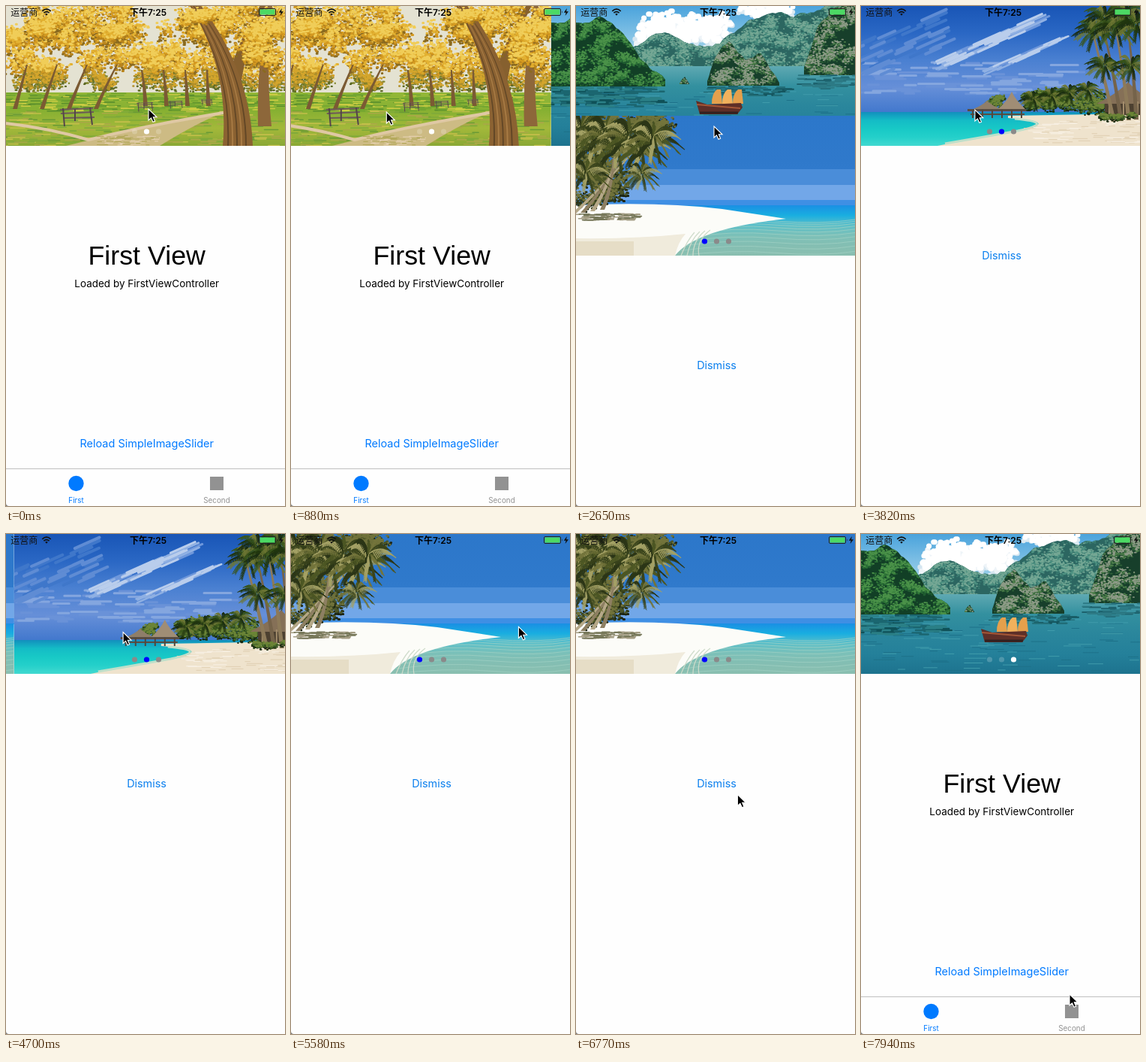
Recreate the animation shown at these times as an HTML page. Size 372 px wide and 665 px high, loop 8 s.

```html
<!DOCTYPE html>
<html lang="en">
<head>
<meta charset="utf-8">
<title>Image slider demo</title>
<style>
html, body { margin: 0; width: 100%; height: 100%; overflow: hidden; background: #fefefe; }
#stage { display: block; width: 372px; height: 665px; }
text { font-family: Inter, Roboto, sans-serif; text-anchor: middle; }
.status text { font-family: Inter, "Noto Sans CJK SC", "Noto Sans CJK", sans-serif; font-size: 12px; }
.title { font-family: "Liberation Sans", sans-serif; }
</style>
</head>
<body>
<svg id="stage" viewBox="0 0 372 665"></svg>
<script>
const W = 372, H = 186, FULL = 665;
const LOOP = 8000, STEP = 147.1;
const fix = n => n.toFixed(1);
const repeat = (n, make) => Array.from({ length: n }, (_, i) => make(i)).join('');

function random(seed) {
  let s = seed * 7919;
  return () => (s = (s * 16807) % 2147483647) / 2147483647;
}

const shape = (d, fill) => `<path d="${d}" fill="${fill}"/>`;
const line = (d, color, width = 1, cap = 'butt') =>
  `<path d="${d}" fill="none" stroke="${color}" stroke-width="${width}" stroke-linecap="${cap}"/>`;
const rect = (x, y, w, h, fill, extra = '') =>
  `<rect x="${x}" y="${y}" width="${w}" height="${h}" fill="${fill}" ${extra}/>`;
const oval = (x, y, rx, ry, fill) =>
  `<ellipse cx="${x}" cy="${y}" rx="${rx}" ry="${ry}" fill="${fill}"/>`;
const label = (x, y, size, fill, str, extra = '') =>
  `<text x="${x}" y="${y}" font-size="${size}" fill="${fill}" ${extra}>${str}</text>`;

// A box filled from top to bottom with evenly spaced colours.
function fade(id, y, h, colors) {
  const stops = colors.map((c, i) =>
    `<stop offset="${i / (colors.length - 1)}" stop-color="${c}"/>`).join('');
  return `<linearGradient id="${id}" x2="0" y2="1">${stops}</linearGradient>` +
    rect(0, y, W, h, `url(#${id})`);
}

// Short round dashes strewn over a box, one path per colour.
function strew(seed, count, [x, y, w, h], size, colors, dash = 1) {
  const rnd = random(seed);
  return colors.map(color => line(
    repeat(count, () => `M${fix(x + rnd() * w)} ${fix(y + rnd() * h)}h${fix(dash * (0.4 + rnd()))}`),
    color, size, 'round')).join('');
}

// Leafy clumps, darkest colour lowest and lightest on top.
function foliage(seed, clumps, [x, y, w, h], spread, size, colors) {
  const rnd = random(seed);
  const centres = Array.from({ length: clumps }, () => [x + rnd() * w, y + rnd() * h]);
  return colors.map((color, k) => line(centres.map(([cx, cy]) => repeat(14, () => {
    const px = cx + (rnd() + rnd() - 1) * spread;
    const py = cy + (rnd() + rnd() - 1) * spread * 0.6 + spread * (0.3 - k * 0.15);
    return `M${fix(px)} ${fix(py)}h${fix(rnd() * 2)}`;
  })).join(''), color, size, 'round')).join('');
}

// A skyline through a few points, roughened by splitting each span.
function hill(seed, points, base, colors) {
  const rnd = random(seed);
  let pts = points;
  for (let round = 0; round < 3; round++) {
    pts = pts.flatMap(([x, y], i) => {
      if (i === pts.length - 1) return [[x, y]];
      const [u, v] = pts[i + 1];
      return [[x, y], [(x + u) / 2, (y + v) / 2 + (rnd() - 0.6) * (u - x) * 0.3]];
    });
  }
  const left = points[0][0], right = points[points.length - 1][0];
  const top = Math.min(...pts.map(p => p[1]));
  const d = `M${left} ${base}L${pts.map(p => p.map(fix).join(' ')).join('L')}L${right} ${base}Z`;
  const box = [left, top, right - left, base - top];
  const clumps = Math.round(box[2] * box[3] / 110);
  return `<clipPath id="hill${seed}"><path d="${d}"/></clipPath>` + shape(d, colors[0]) +
    `<g clip-path="url(#hill${seed})">${foliage(seed, clumps, box, 11, 1.7, colors)}</g>`;
}

// A tapering trunk from its foot to its tip, bent towards a control point.
const trunk = (x, y, cx, cy, tx, ty, w, color) => shape(
  `M${fix(x - w / 2)} ${y}Q${fix(cx - w / 3)} ${cy} ${fix(tx - w / 6)} ${ty}h${fix(w / 3)}` +
  `Q${fix(cx + w / 3)} ${cy} ${fix(x + w / 2)} ${y}Z`, color);

function palm(x, y, r, seed, colors) {
  const rnd = random(seed);
  const fronds = 15;
  return repeat(fronds, i => {
    const a = (i + rnd() * 0.6) / fronds * Math.PI * 2;
    const len = r * (0.75 + rnd() * 0.3);
    const cx = x + Math.cos(a) * len * 0.55, cy = y + Math.sin(a) * len * 0.55 - r * 0.22;
    const ex = x + Math.cos(a) * len, ey = y + Math.sin(a) * len * 0.75 + r * 0.22;
    let d = `M${fix(x)} ${fix(y)}Q${fix(cx)} ${fix(cy)} ${fix(ex)} ${fix(ey)}`;
    for (let t = 0.15; t < 1; t += 0.06) {
      const u = 1 - t;
      const px = u * u * x + 2 * u * t * cx + t * t * ex;
      const py = u * u * y + 2 * u * t * cy + t * t * ey;
      const drop = r * 0.28 * (1.1 - t * 0.7);
      d += `M${fix(px + Math.cos(a) * r * 0.1 + 2)} ${fix(py + drop)}L${fix(px)} ${fix(py)}` +
           `l${fix(Math.cos(a) * r * 0.14 - 2)} ${fix(drop * 0.6)}`;
    }
    return line(d, colors[i % colors.length], fix(Math.max(0.7, r / 32)));
  });
}

function bench(x, y, s) {
  return `<g transform="translate(${x} ${y}) scale(${s})">` +
    line('M0 3L44 1M1 8L45 6M4 14L46 13', '#6d5a57', 2.2) +
    line('M4 1L6 25M20 2V18M40 0L43 23', '#54454a', 2) + '</g>';
}

function park() {
  const gold = ['#8a6a1f', '#b9841c', '#d59a20', '#e3b232', '#f0cd58'];
  const olive = ['#5d6a24', '#80842a', '#b08f2a', '#d3a52c'];
  const bark = '#7b5a33';
  return rect(0, 0, W, H, '#e4e2d2') +
    foliage(2, 75, [0, 30, W, 62], 20, 3, gold) +
    foliage(3, 32, [30, 0, 140, 40], 18, 2.6, gold) +
    foliage(4, 26, [232, 0, 140, 40], 18, 2.6, gold) +
    foliage(5, 38, [0, 90, W, 16], 16, 2.4, olive) +
    fade('grass', 115, 71, ['#94b838', '#86b032', '#a3b83a', '#8aa835']) +
    strew(6, 90, [-10, 116, W, 24], 1.6, ['#5b8f2c', '#c9cb42', '#72a530'], 16) +
    strew(7, 60, [-10, 140, W, 46], 1.6, ['#6a9a35', '#c3bf4a', '#7fa93a', '#a9a847'], 18) +
    shape('M80 186Q150 168 290 141Q250 158 205 186Z', '#cdbb84') +
    line('M0 156Q60 163 110 178Q190 158 290 142', '#dfc8a4', 4) +
    strew(8, 30, [120, 172, 80, 13], 1.2, ['#e4cfae', '#b4a95c'], 10) +
    repeat(4, i => trunk(12 + i * 36, 137, 18 + i * 37, 115, 28 + i * 40, 78, 6, bark)) +
    repeat(5, i => trunk(186 + i * 28, 133, 185 + i * 28, 110, 181 + i * 29, 85, 6, bark)) +
    trunk(345, 160, 340, 80, 352, 0, 18, '#8d673a') +
    trunk(302, 110, 315, 45, 345, -5, 20, '#86602f') +
    trunk(309, 186, 312, 80, 246, -10, 40, '#8b6232') +
    repeat(5, i => trunk(296 + i * 6, 186, 300 + i * 5, 85, 246 + i * 2, 0, 2, i % 2 ? '#a97c45' : '#614626')) +
    foliage(9, 26, [310, 0, 62, 75], 16, 2.6, gold) +
    foliage(10, 7, [235, 5, 45, 20], 12, 2.4, gold) +
    bench(72, 135, 1) + repeat(3, i => bench(174 + i * 43, 128 - i * 2, 0.5 - i * 0.08));
}

function bay() {
  const green = ['#123f26', '#1f5c30', '#2f7738', '#4a9148'];
  const grey = ['#173f2b', '#2f6238', '#4f7f4c', '#8c9a86'];
  const haze = ['#2c6661', '#3a7d72', '#4f9282', '#74a794'];
  const sail = i => shape(`M${181 + i * 14} 130q0 -14 7 -19h5l2 19Z`, i % 2 ? '#f1b15c' : '#e5a04c');
  return fade('baySky', 0, 82, ['#4aa3dc', '#bfe3ef']) +
    foliage(12, 22, [70, 16, 120, 26], 22, 7, ['#d5e6f0', '#eef4f8', '#ffffff']) +
    foliage(13, 8, [225, 0, 60, 8], 18, 6, ['#dceaf2', '#ffffff']) +
    hill(14, [[76, 55], [100, 40], [150, 50], [192, 50], [230, 19], [258, 10], [290, 15], [326, 5], [W, 0]], 88, haze) +
    fade('baySea', 80, 106, ['#5fa9b2', '#33909f', '#2a869c', '#24809a', '#1d738e']) +
    hill(15, [[304, 82], [322, 28], [346, 2], [W, -4]], 92, grey) +
    hill(16, [[0, 22], [35, 15], [60, 34], [85, 70], [119, 98]], 107, green) +
    hill(17, [[175, 100], [186, 68], [204, 47], [226, 72], [246, 63], [271, 102]], 106, grey) +
    hill(18, [[138, 103], [145, 94], [151, 103]], 104, grey) +
    strew(19, 34, [-10, 108, 110, 26], 2.5, ['#0f5158', '#1b6670', '#2a7f86'], 18) +
    strew(20, 24, [170, 107, 100, 12], 2, ['#15565f', '#226f79'], 16) +
    strew(21, 22, [290, 92, 90, 18], 2, ['#1d626d', '#2c7a85'], 16) +
    strew(22, 45, [-10, 110, W, 74], 1, ['#1d7189', '#3f9bab'], 22) +
    repeat(3, sail) + shape('M160 126L175 131 220 129 222 135 215 144H165Z', '#5e2f28') +
    line('M161 131L219 136', '#a55737', 2) + line('M165 142H216', '#33201f', 3);
}

function beach() {
  const frond = ['#2b3516', '#4c5623', '#73743b', '#39431b', '#a3a064'];
  const dark = ['#1d2512', '#2e381a', '#4b5528', '#6f713a'];
  const ripple = i => {
    const y = 138 + i * i * 0.3 + i * 2;
    return `M${180 - i * 5} ${fix(y + 6)}Q205 ${fix(y - 3)} 266 ${fix(y + 2)}T372 ${fix(y)}`;
  };
  return fade('beachSky', 0, 120, ['#2c77ca', '#2f79cb', '#347ecf']) +
    rect(0, 71, W, 21, '#4a8dd9') + rect(0, 92, W, 20, '#72a7e8') + rect(0, 112, W, 8, '#3f8fe4') +
    fade('beachSea', 119, 67, ['#1a8fe4', '#19aee0', '#5cbfc8', '#7cc0b8', '#84beb2', '#8abfb0']) +
    line(repeat(12, ripple), '#a3d2c4', 0.7) +
    shape('M0 119Q110 114 195 124L280 137Q160 150 132 186H0Z', '#fcfcf8') +
    shape('M0 163Q80 164 146 157Q136 168 132 186H0Z', '#f0ebdc') + rect(0, 167, 77, 19, '#e6ddc6') +
    line(repeat(4, i => `M${158 + i * 7} ${155 - i}Q${148 + i * 4} 166 ${140 + i * 8} 186`), '#cfdccb', 1.2) +
    strew(23, 40, [0, 130, 80, 9], 1.6, ['#a39c83', '#77785a'], 10) +
    foliage(24, 32, [-5, 0, 62, 112], 20, 3, dark) +
    foliage(25, 16, [50, 0, 68, 30], 18, 2.6, dark) +
    repeat(4, i => trunk(i * 13 - 4, 131 - i * 2, 30 + i * 7, 100 - i * 3, 78 - i * 9, 46 - i * 4, 6, i % 2 ? '#8d7f62' : '#b5a888')) +
    repeat(7, i => palm(8 + i * 16, 14 + (i * 19) % 34, 38, 26 + i, frond)) +
    palm(88, 76, 25, 34, frond) + palm(14, 74, 32, 35, frond);
}

function resort() {
  const frond = ['#22370f', '#39551b', '#6f7834', '#1b2d12'];
  const bush = ['#16280f', '#294619', '#47692a', '#6b8436'];
  const cloud = ['#6e97db', '#8fb0e3', '#b9cdec'];
  const roof = (x, y, w, h, color) =>
    shape(`M${x - w} ${y}Q${x - w * 0.3} ${y - h * 0.5} ${x} ${y - h}Q${x + w * 0.3} ${y - h * 0.5} ${x + w} ${y}Z`, color);
  return fade('resortSky', 0, 144, ['#1955b6', '#2a67c4', '#4a80d1', '#668fd8', '#3f76cc']) +
    strew(36, 40, [-20, 75, 300, 42], 3, ['#6a92d8', '#84a6df'], 30) +
    '<g transform="rotate(-24 160 60)">' +
    strew(37, 26, [95, 48, 130, 12], 3, cloud, 28) +
    strew(38, 14, [150, 85, 100, 7], 2.5, cloud, 24) +
    strew(39, 26, [-40, -15, 150, 50], 4, ['#3f77ca', '#5f8cd4'], 30) + '</g>' +
    fade('resortSea', 141, 45, ['#128fbd', '#14bcc6', '#18c9c6', '#24d0ca', '#42d9d0']) +
    shape('M196 146L372 143V186H102Q160 174 209 166Q270 154 196 149Z', '#efe3cd') +
    line('M112 183Q165 174 209 166Q262 155 205 150', '#bfdfc9', 3) +
    strew(40, 40, [215, 152, 157, 30], 1.2, ['#e2d2b6', '#f7efe2'], 16) +
    foliage(41, 34, [222, 114, 98, 22], 12, 2.2, bush) + foliage(42, 6, [172, 121, 16, 10], 7, 2, bush) +
    repeat(4, i => palm(230 + i * 24, 122 - i * 4, 17, 43 + i, frond)) +
    rect(142, 137, 78, 3, '#594d42') + rect(146, 143, 72, 2, '#594d42') +
    line(repeat(6, i => `M${149 + i * 13} 138v11`), '#52473c', 2) +
    roof(168, 137, 18, 11, '#8f7e69') + roof(201, 137, 18, 23, '#a08d75') +
    rect(325, 128, 47, 17, '#4c4030') + roof(356, 130, 42, 29, '#857057') +
    line(repeat(3, i => `M${331 + i * 19} 127v21`), '#a38d6c', 2) +
    repeat(4, i => trunk(337 + i * 10, 154 - i, 326 + i * 13, 100, 308 + i * 16, 32, 6, i % 2 ? '#75634a' : '#8d7a59')) +
    repeat(5, i => palm(312 + i * 14, 30 - (i * 17) % 30, 30, 48 + i, frond)) +
    repeat(2, i => palm(325 + i * 36, 78, 24, 55 + i, frond)) +
    foliage(57, 5, [318, 142, 50, 6], 8, 2, bush);
}

const slider = (id, slides) =>
  `<svg width="${W}" height="${H}"><g id="${id}">` +
  slides.map((art, i) => `<svg x="${i * W}" width="${W}" height="${H}">${art}</svg>`).join('') +
  `</g></svg><g id="${id}Dots">` +
  repeat(3, i => `<circle cx="${171.5 + i * 16}" cy="167" r="3.6"/>`) + '</g>';

const statusBar = '<g class="status">' +
  label(24.2, 12.8, 12, '#111', '运营商') +
  line('M48.3 6.8Q54 1.6 59.7 6.8M50.4 9.2Q54 6 57.6 9.2', '#111', 1.6) +
  shape('M52.2 10.7Q54 9.2 55.8 10.7L54 12.7Z', '#111') +
  label(189.5, 12.8, 12, '#000', '下午7:25', 'font-weight="600"') +
  rect(337.5, 3.5, 22, 9, 'none', 'rx="1.5" stroke="#222"') +
  rect(338.5, 4.5, 20, 7, '#4cd964') + shape('M361 6.2q1.6 1.8 0 3.6Z', '#222') +
  shape('M367.8 3L363.8 8.7H366.6L365.6 13 370 7.2H367.1Z', '#111') + '</g>';

const home = rect(0, 0, W, FULL, '#fefefe') + slider('main', [park(), bay()]) +
  label(187.7, 344, 35.8, '#000', 'First View', 'class="title"') +
  label(187.7, 374, 13.5, '#000', 'Loaded by FirstViewController') +
  label(187.7, 586.5, 14.5, '#007aff', 'Reload SimpleImageSlider') +
  rect(0, 615, W, 1, '#c0c0c0') +
  oval(93.5, 635, 10.2, 10.2, '#007aff') + label(93.5, 661.3, 9.9, '#007aff', 'First') +
  rect(272, 626, 18, 18, '#929292') + label(281, 661.3, 9.9, '#929292', 'Second');

const sheet = rect(0, 0, W, FULL, '#fefefe') + slider('modal', [beach(), resort()]) +
  label(187.5, 337, 14.4, '#0a7fee', 'Dismiss');

document.getElementById('stage').innerHTML = home + `<g id="sheet">${sheet}</g>` + statusBar +
  shape('M0 661Q0 665 4 665H0Z', '#777') +
  '<path id="pointer" d="M0 0V15L3.5 11.8 6 17.3 8.6 16.2 6.3 10.8H11Z" fill="#000" stroke="#fff" stroke-width="1.1"/>';

// Places the pointer visits: time, x, y.
const STOPS = [[0, 190, 137], [700, 160, 142], [880, 128, 141], [1180, 52, 142], [1700, 52, 142],
  [2500, 184, 160], [2800, 184, 160], [3250, 258, 143], [3820, 152, 138], [4600, 132, 133],
  [5400, 312, 114], [6330, 270, 160], [6770, 215, 348], [7100, 191, 334], [7480, 191, 334], [7940, 278, 612]];
const PRESENT = 2500, DISMISS = 7473, RATE = 0.0194;

const clamp = p => Math.min(1, Math.max(0, p));
const smooth = p => p * p * (3 - 2 * p);
const swipe = (now, from, to) => W * smooth(clamp((now - from) / (to - from)));

function pointerAt(now) {
  const next = STOPS.findIndex(s => s[0] > now);
  if (next < 0) return STOPS[STOPS.length - 1].slice(1);
  const [t0, x0, y0] = STOPS[next - 1], [t1, x1, y1] = STOPS[next];
  const p = (now - t0) / (t1 - t0);
  return [x0 + (x1 - x0) * p, y0 + (y1 - y0) * p];
}

// Critically damped spring: what is left of the way, from 1 to 0.
function remaining(ms) {
  const x = Math.max(0, ms) * RATE;
  return (1 + x) * Math.exp(-x);
}

const el = id => document.getElementById(id);
const move = (id, x, y) => el(id).setAttribute('transform', `translate(${fix(x)} ${fix(y)})`);

function paintDots(id, active, on, off, alpha) {
  [...el(id).children].forEach((dot, i) => {
    dot.setAttribute('fill', i === active ? on : off);
    dot.setAttribute('fill-opacity', i === active ? 1 : alpha);
  });
}

function draw(now) {
  const main = swipe(now, 800, 1320);
  const modal = swipe(now, 3300, 3820) - swipe(now, 4640, 5300);
  const left = now < DISMISS ? remaining(now - PRESENT) : 1 - remaining(now - DISMISS);
  move('main', -main, 0);
  move('modal', -modal, 0);
  move('sheet', 0, left > 0.998 ? FULL : Math.round(FULL * left));
  move('pointer', ...pointerAt(now));
  paintDots('mainDots', main > W / 2 ? 2 : 1, '#fff', '#fff', 0.2);
  paintDots('modalDots', modal > W / 2 ? 1 : 0, '#00f', '#8a8a8a', 1);
}

const start = performance.now();
let shown = -1;
function play() {
  const tick = Math.floor(((performance.now() - start) % LOOP + 10) / STEP);
  if (tick !== shown) draw((shown = tick) * STEP);
  requestAnimationFrame(play);
}
play();
</script>
</body>
</html>
```
